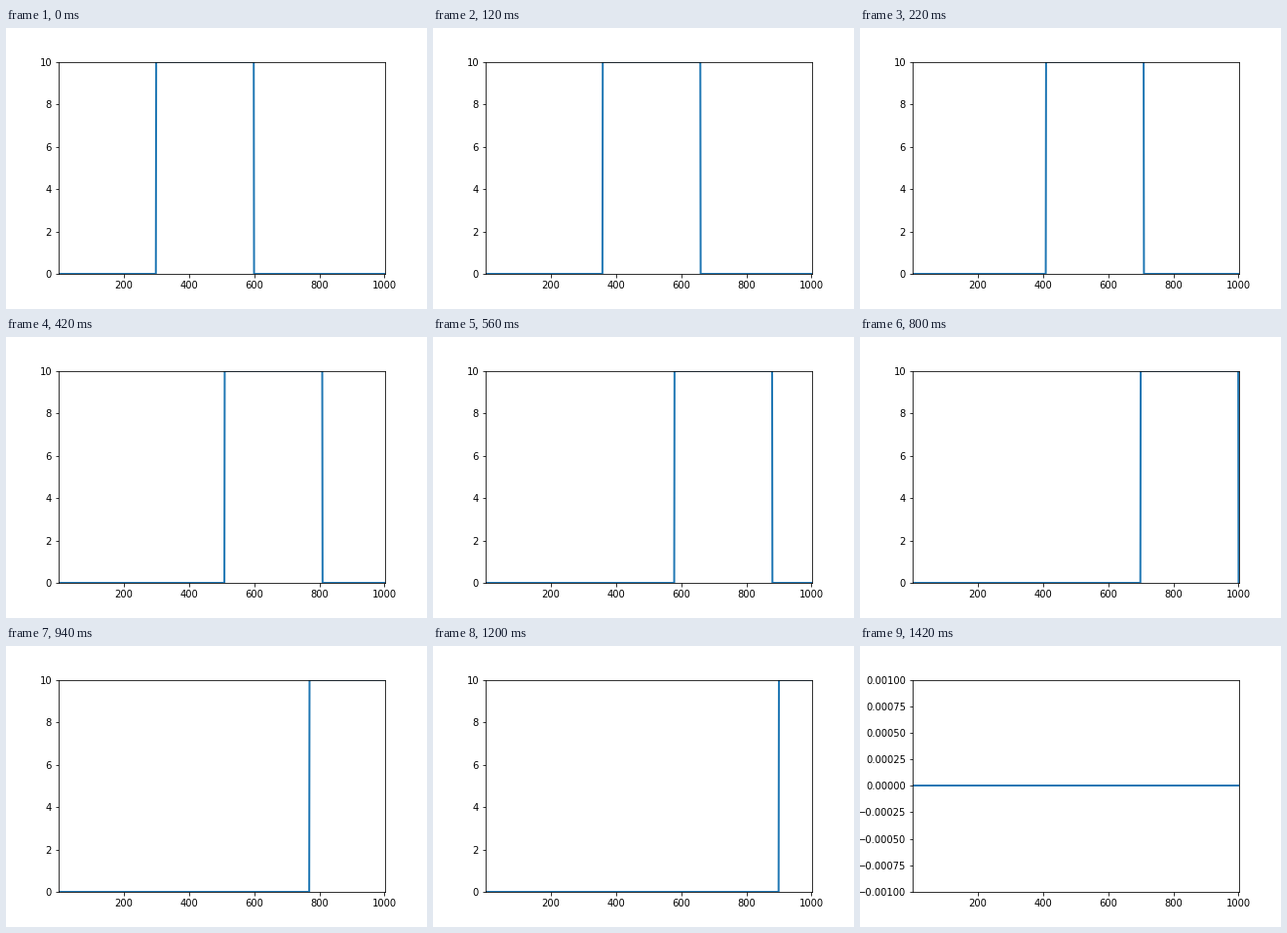
A matplotlib script that plays this animation: 432 px wide and 288 px high, repeating every 2000 ms.

```python
import numpy as np
import matplotlib.pyplot as plt
from matplotlib.animation import FuncAnimation

FRAMES, INTERVAL = 100, 20
STEP = 10                    # distance the pulse travels per frame
START, END, HEIGHT = 300, 600, 10

plt.rcParams["font.family"] = "DejaVu Sans"

fig, ax = plt.subplots(figsize=(6, 4), dpi=72)
fig.subplots_adjust(left=0.125, right=0.9, bottom=0.125, top=0.88)

x = np.arange(1, 1002)
line, = ax.plot(x, np.zeros(x.size), color="C0", lw=2)
ax.set_xlim(x[0], x[-1])


def pulse(shift):
    inside = (x >= START + shift) & (x < END + shift)
    return np.where(inside, HEIGHT, 0)


def update(i):
    y = pulse(STEP * i)
    line.set_ydata(y)
    # A flat line gets a tiny symmetric range
    if y.any():
        ax.set_ylim(0, HEIGHT)
    else:
        ax.set_ylim(-0.001, 0.001)
    return line,


anim = FuncAnimation(fig, update, frames=FRAMES, interval=INTERVAL,
                     init_func=lambda: update(0), repeat=True,
                     repeat_delay=0, blit=False)
plt.show()
```
